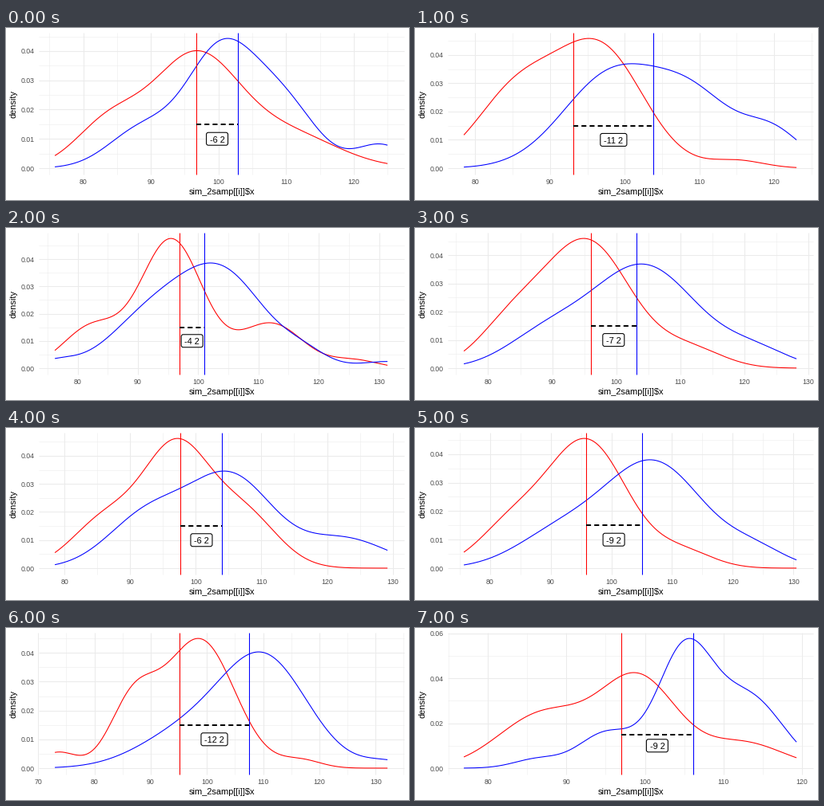
Recreate the animation shown at these times as a matplotlib script. Size 504 by 216 pixels, loop 8000 ms.

```python
import numpy as np
import matplotlib.pyplot as plt
from matplotlib.animation import FuncAnimation
from matplotlib.patches import FancyBboxPatch

plt.rcParams["font.family"] = "Liberation Sans"

W, H = 504, 216
LEFT, RIGHT, TOP, BOTTOM = 41, 498, 6, 184.5   # plot panel
X0, X1 = 61.6, 477.6                           # pixels of the data range
BASE, PEAK = 176.5, 162.9                      # zero row, height of the tallest curve
GRID = "#EBEBEB"
T = np.linspace(0, 100, 400)                   # percent of the data range


def mix(*bumps):
    """Density as a sum of bells: (centre, width, height), all in percent."""
    return sum(h * np.exp(-((T - c) / w) ** 2 / 2) for c, w, h in bumps)


scenes = []


def add_scene(span, means, peak, red, blue):
    """span, means: data units; peak: highest density in hundredths."""
    scale = PEAK / max(red.max(), blue.max())
    scenes.append((span, means, peak, red * scale, blue * scale))


add_scene((75.8, 125), (96.76, 102.85), 4.43,
          mix((16, 10, 33), (42, 13, 85), (70, 15, 26)),
          mix((26, 10, 29), (50, 10.5, 90), (69, 10, 46), (98, 7.5, 18)))
add_scene((78.47, 123), (93.16, 103.87), 4.58,
          mix((16, 12.3, 59), (41, 13, 92), (82, 8, 6)),
          mix((45, 15, 74), (70, 12, 47), (93, 9, 27)))
add_scene((76.23, 131.4), (96.97, 101), 4.76,
          mix((11, 8.5, 31), (35, 9.3, 98), (65, 9.5, 34), (90, 7, 6)),
          mix((0, 6, 5), (28, 12, 35), (50, 13, 72), (75, 7, 9), (100, 8, 5)))
add_scene((76.2, 128.2), (96, 103.2), 4.6,
          mix((14, 10, 30), (37, 13, 96), (68, 10, 14)),
          mix((24, 12, 22), (54, 16, 78), (88, 10, 12)))
add_scene((78.55, 129.2), (97.71, 104.04), 4.62,
          mix((15, 10, 37), (36.5, 10, 93), (57, 10, 41)),
          mix((28, 12, 41), (53, 12.5, 70), (87, 13, 23)))
add_scene((75.7, 130.5), (95.8, 105), 4.55,
          mix((14, 10, 30), (37, 12, 96), (66, 9, 12)),
          mix((28, 13, 24), (57, 15, 80), (88, 9, 12)))
add_scene((72.96, 132.1), (95.12, 107.5), 4.5,
          mix((1, 5.5, 12), (23.5, 7, 48), (43.5, 10.5, 98), (74, 6, 6)),
          mix((39, 14, 26), (63, 13, 82), (100, 7, 5)))
add_scene((76.95, 119.3), (96.98, 106.15), 5.77,
          mix((24, 13.5, 43), (52.5, 11.5, 70), (84, 12, 20)),
          mix((22, 7, 7), (43, 8.5, 28), (66.5, 8.3, 93), (86, 10, 55)))

fig = plt.figure(figsize=(7, 3), dpi=72, facecolor="white")
ax = fig.add_axes([0, 0, 1, 1])


def line(xs, ys, color, width=1.07, **style):
    ax.plot(xs, ys, color=color, lw=width, solid_capstyle="butt", **style)


def tick_text(x, y, text, align):
    ax.text(x, y, text, size=8.8, color="#4D4D4D", ha=align, va="baseline")


def draw_grid(to_x, to_y, y_step):
    for value in range(60, 151, 5):
        x, major = to_x(value), value % 10 == 0
        if not LEFT - 0.5 <= x <= RIGHT:
            continue
        line([x, x], [TOP, BOTTOM], GRID, 1.07 if major else 0.53)
        if major:
            tick_text(x, 196, str(value), "center")
    for i in range(13):
        value, major = i * y_step / 2, i % 2 == 0
        y = to_y(value)
        if y < TOP:
            break
        line([LEFT, RIGHT], [y, y], GRID, 1.07 if major else 0.53)
        if major:
            tick_text(36.5, y + 3.5, f"{value / 100:.2f}", "right")


def draw_label(x, y, text):
    w, h = 2.6 + 6.1 * len(text), 16
    ax.add_patch(FancyBboxPatch((x - w / 2, y - h / 2), w, h,
                                boxstyle="round,pad=0,rounding_size=2.5",
                                fc="white", ec="black", lw=1.07, zorder=5))
    ax.text(x, y + 4.5, text, size=11, ha="center", va="baseline", zorder=6)


def draw(i):
    (low, high), means, peak, red, blue = scenes[i]

    def to_x(value):
        return X0 + (value - low) / (high - low) * (X1 - X0)

    def to_y(value):
        return BASE - value / peak * PEAK

    ax.clear()
    ax.set_xlim(0.5, W + 0.5)
    ax.set_ylim(H + 0.5, 0.5)
    ax.axis("off")
    draw_grid(to_x, to_y, 2 if peak > 5 else 1)
    curve_x = X0 + T / 100 * (X1 - X0)
    line(curve_x, BASE - red, "red")
    line(curve_x, BASE - blue, "blue")
    ends = [to_x(m) for m in means]
    for x, color in zip(ends, ("red", "blue")):
        line([x, x], [TOP, BOTTOM], color)
    line(ends, [to_y(1.5)] * 2, "black", 2, ls=(0, (3.05, 2.05)),
         dash_capstyle="butt")
    draw_label(sum(ends) / 2, to_y(1), f"{means[0] - means[1]:.0f} 2")
    ax.text(270, 209.5, "sim_2samp[[i]]$x", size=11, ha="center",
            va="baseline", parse_math=False)
    ax.text(10, 95.5, "density", size=11, rotation=90, ha="center", va="center")
    return []


anim = FuncAnimation(fig, draw, frames=len(scenes), init_func=lambda: [],
                     interval=1000, repeat=True, repeat_delay=0)
plt.show()
```
